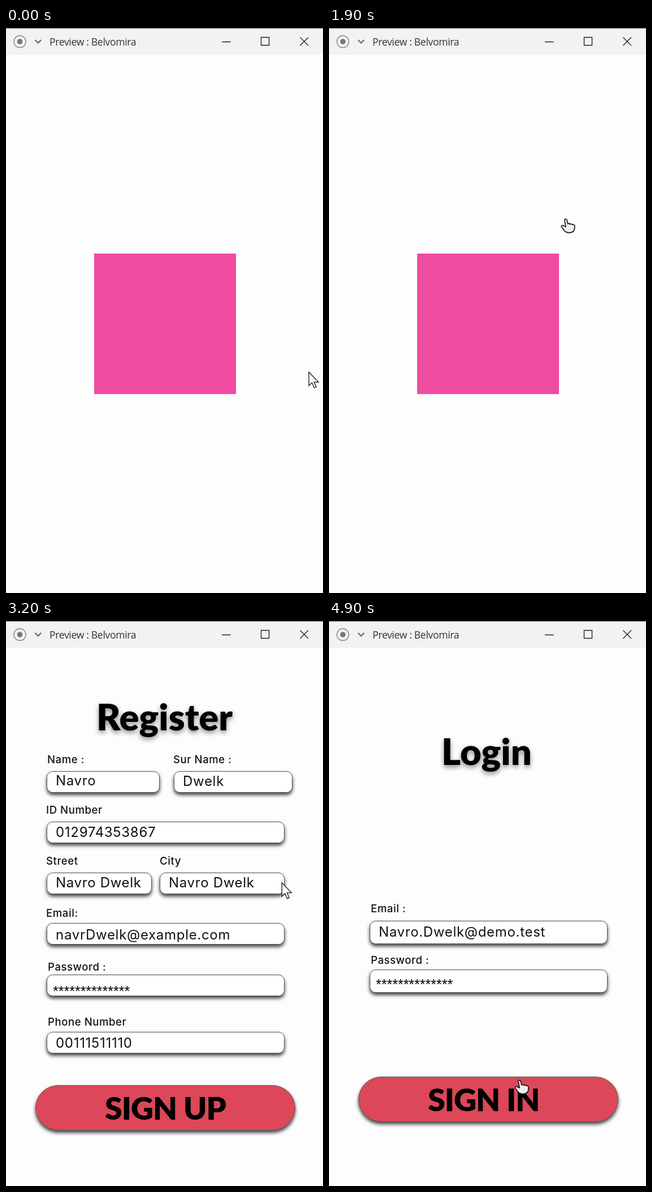
Animation, 561 px wide and 997 px high, one loop 5 s. Source, as an HTML page:

```html
<!DOCTYPE html>
<html lang="en">
<head>
<meta charset="utf-8">
<title>Sign-up preview</title>
<style>
  html, body { margin: 0; width: 100%; height: 100%; overflow: hidden; background: #fefdfe; }
  svg { display: block; width: 100%; height: 100%; }
  text { white-space: pre; }
  .bar { font: 500 17.5px "Open Sans", "Noto Sans", sans-serif; letter-spacing: -.3px; fill: #333; }
  .label { font: 500 18.5px Inter, sans-serif; letter-spacing: .6px; fill: #111; }
  .value { font: 24px Inter, sans-serif; letter-spacing: .7px; fill: #111; }
  .stars { font: 25px "Liberation Sans", Arial, sans-serif; fill: #000; }
  .head { font: 900 65px Lato, sans-serif; filter: drop-shadow(0 4px 4px rgba(0,0,0,.45)); }
  .action { font: 900 55.5px Lato, sans-serif; letter-spacing: -1px; }
  .box { fill: #fff; stroke: #555; filter: drop-shadow(0 4px 3px rgba(0,0,0,.75)); }
  .button { fill: #dc4759; stroke: #66575b; filter: drop-shadow(0 4px 3px rgba(0,0,0,.75)); }
  .icon { fill: none; stroke: #222; stroke-width: 1.4; }
</style>
</head>
<body>
<svg viewBox="0 0 561 997" preserveAspectRatio="none">
  <rect width="561" height="997" fill="#fefdfe"/>
  <rect x="156" y="398" width="251" height="248" fill="#ef4c9f"/>
  <g id="register"></g>
  <g id="login"></g>
  <g>
    <rect width="561" height="47" fill="#f3f1f4"/>
    <rect width="561" height="1" fill="#666"/>
    <circle cx="24.5" cy="24" r="10.5" fill="none" stroke="#8a8a8a" stroke-width="1.5"/>
    <circle cx="24.5" cy="24" r="4.8" fill="#777"/>
    <path d="M51.5 21l5.3 5.5 5.3-5.5" fill="none" stroke="#666" stroke-width="2.2"/>
    <text class="bar" x="77" y="31">Preview : Belvomira</text>
    <path class="icon" d="M382 24.5h15.5M451.5 16.5h14v14h-14zM520.5 16.5l14.5 14.5M535 16.5l-14.5 14.5"/>
  </g>
  <path id="arrow" d="M0 0V24L5.5 19 9.5 28 13 26.5 9.200 17.8H17Z" fill="#fff" stroke="#111" stroke-width="1.3"/>
  <path id="hand" d="M-1 2Q1-1 3 1.5L5 9q2-2 4 .5 2-1.5 4 .8 3-1 4 1.7V15Q17 24.5 7 24.5 1 24.5-2 20L-6.5 14q-.5-3 2.5-2.5L1.2 14Z" fill="#eee" stroke="#1c1c1c" stroke-width="1.7" stroke-linejoin="round"/>
</svg>
<script>
const LOOP = 5000, STEP = 100;
const $ = id => document.getElementById(id);

const text = (kind, x, y, s) => `<text class="${kind}" x="${x}" y="${y}">${s}</text>`;
const rect = (kind, x, y, w, h, r) =>
  `<rect class="${kind}" x="${x + .5}" y="${y + .5}" width="${w - 1}" height="${h - 1}" rx="${r}"/>`;
const field = (x, y, w, h, base, value) =>
  rect("box", x, y, w, h, 10) + text("value", x + 16, base, value);
const secret = (y, h, base) =>
  rect("box", 72, y, 421, h, 10) + text("stars", 83, base, "*".repeat(14));
const button = (y, s) =>
  rect("button", 52, y, 460, 80, 40) + text("action", 175, y + 61, s);
const page = (...parts) =>
  `<rect width="561" height="997" fill="#fefdfe"/>` + parts.join("");

$("register").innerHTML = page(
  text("head", 160, 193, "Register"),
  text("label", 73, 251, "Name :"), field(72, 265, 200, 38, 290, "Navro"),
  text("label", 296, 251, "Sur Name :"), field(297, 265, 210, 38, 291, "Dwelk"),
  text("label", 71, 340, "ID Number"), field(72, 354, 421, 38, 381, "012974353867"),
  text("label", 71, 430, "Street"), field(72, 444, 186, 38, 470, "Navro Dwelk"),
  text("label", 272, 430, "City"), field(272, 444, 221, 38, 470, "Navro Dwelk"),
  text("label", 71, 522, "Email:"), field(72, 533, 421, 38, 562, "navrDwelk@example.com"),
  text("label", 74, 617, "Password :"), secret(624, 38, 662),
  text("label", 74, 714, "Phone Number"), field(72, 725, 421, 38, 753, "00111511110"),
  button(819, "SIGN UP"));

$("login").innerHTML = page(
  text("head", 199, 254, "Login"),
  text("label", 74, 514, "Email :"), field(72, 529, 421, 41, 557, "Navro.Dwelk@demo.test"),
  text("label", 74, 605, "Password :"), secret(615, 41, 650),
  button(804, "SIGN IN"));

// Pointer tip: time, x, y
const route = [
  [0, 536, 607], [200, 525, 632], [600, 465, 648], [1200, 213, 161],
  [1800, 413, 334], [2400, 478, 372], [2600, 476, 378], [2800, 464, 374],
  [3000, 468, 389], [3600, 546, 670], [4100, 546, 670], [4200, 490, 650],
  [4800, 470, 836], [4900, 336, 810]
];

function tipAt(t) {
  const i = route.findIndex(p => p[0] > t);
  if (i < 0) return route[route.length - 1].slice(1);
  const [t0, x0, y0] = route[i - 1], [t1, x1, y1] = route[i];
  const k = (t - t0) / (t1 - t0), e = k * k * (3 - 2 * k);
  return [x0 + (x1 - x0) * e, y0 + (y1 - y0) * e];
}

function fade(t, start, length) {
  const k = Math.min(1, Math.max(0, (t - start) / length));
  return 1 - (1 - k) ** 2;
}

function show(id, opacity) {
  $(id).style.opacity = opacity;
  $(id).style.display = opacity > 0 ? "" : "none";
}

const begin = performance.now();
function draw() {
  const now = Math.max(0, performance.now() - begin) % LOOP;
  const t = Math.floor(now / STEP) * STEP;
  const [x, y] = tipAt(t);
  const pointing = (t >= 100 && t < 2700) || (t > 4200 && y > 804);
  show("register", fade(t, 2600, 300));
  show("login", fade(t, 3900, 275));
  show("arrow", pointing ? 0 : 1);
  show("hand", pointing ? 1 : 0);
  for (const id of ["arrow", "hand"]) $(id).setAttribute("transform", `translate(${x} ${y})`);
  requestAnimationFrame(draw);
}
draw();
</script>
</body>
</html>
```
